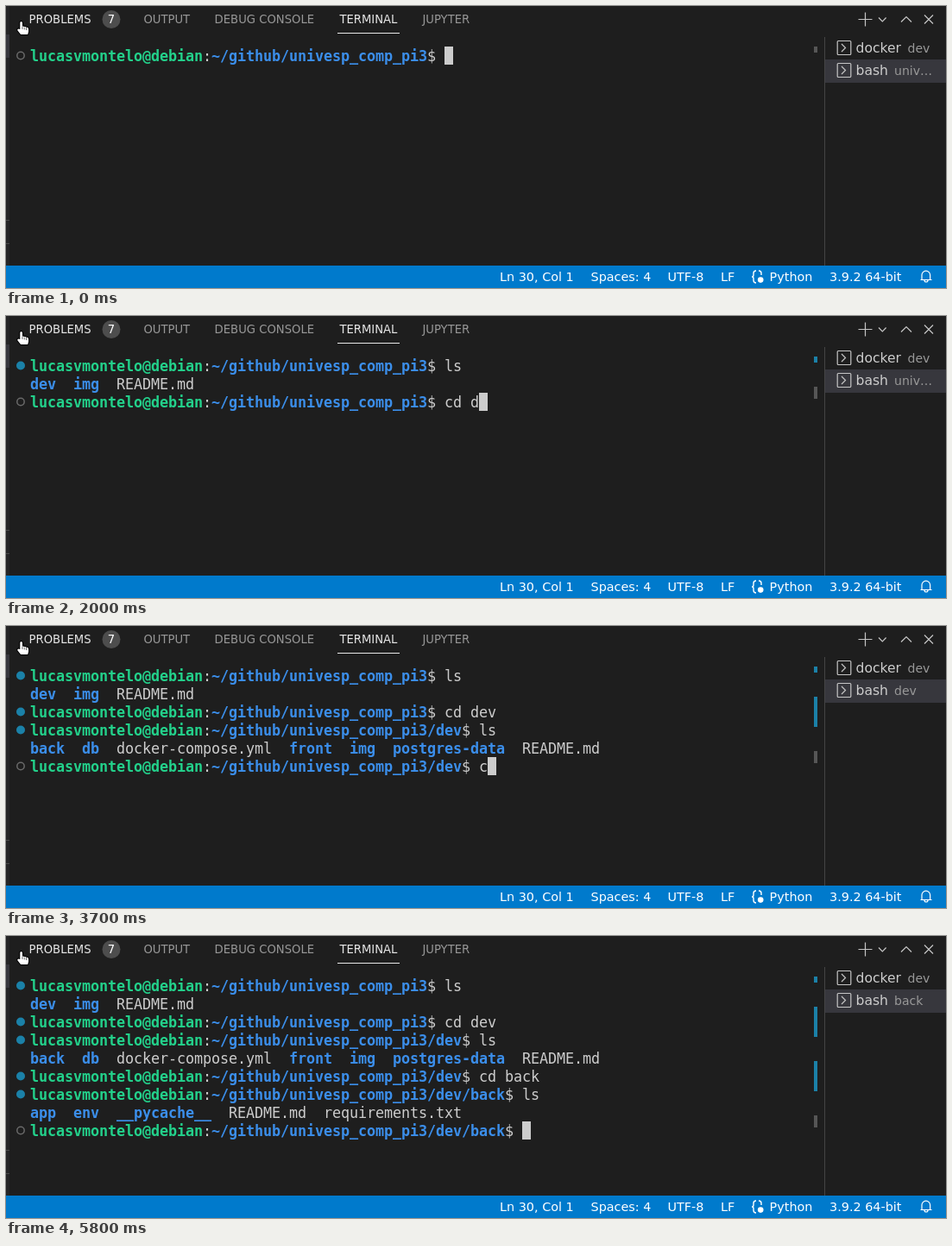
An HTML page with a canvas that plays this animation: 1089 by 327 pixels, repeating every 8000 ms.

```html
<!DOCTYPE html>
<html lang="en">
<head>
<meta charset="utf-8">
<title>Terminal panel</title>
<style>
html, body { margin: 0; width: 100%; height: 100%; overflow: hidden; background: #1e1e1e; }
canvas { display: block; }
</style>
</head>
<body>
<canvas id="stage" width="1089" height="327"></canvas>
<script>
const ctx = document.getElementById('stage').getContext('2d');
const LOOP = 8000, LEFT = 28, TOP = 47, CELL = 10, ROW = 21;
const SANS = '"DejaVu Sans", sans-serif';
const MONO = '16.8px "DejaVu Sans Mono", monospace';
const GREEN = '#23d18b', BLUE = '#3b8eea', FG = '#cccccc', DONE = '#1b81a8', IDLE = '#565656';
const USER = 'lucasvmontelo@debian', HOME = '~/github/univesp_comp_pi3';

// A leading * in the output marks a directory.
const jobs = [
  { path: '', cmd: 'ls', keys: [700, 800], enter: 1000, mark: 1100, out: '*dev  *img  README.md' },
  { path: '', cmd: 'cd dev', keys: [1600, 1700, 1800, 2000, 2200, 2300], enter: 2500 },
  { path: '/dev', cmd: 'ls', keys: [2800, 3000], enter: 3100,
    out: '*back  *db  docker-compose.yml  *front  *img  *postgres-data  README.md' },
  { path: '/dev', cmd: 'cd back', keys: [3700, 3800, 3900, 4200, 4300, 4700, 4900], enter: 5300 },
  { path: '/dev/back', cmd: 'ls', keys: [5500, 5600], enter: 5800,
    out: '*app  *env  *__pycache__  README.md  requirements.txt' },
  { path: '/dev/back', cmd: '', keys: [], enter: Infinity }
];

function rect(x, y, w, h, color) {
  ctx.fillStyle = color;
  ctx.fillRect(x, y, w, h);
}

function label(text, x, y, size, color) {
  ctx.font = size + 'px ' + SANS;
  ctx.fillStyle = color;
  ctx.fillText(text, x, y);
}

function disc(x, y, r, color) {
  ctx.fillStyle = color;
  ctx.beginPath();
  ctx.arc(x, y, r, 0, Math.PI * 2);
  ctx.fill();
}

function stroke(d, color, width = 1.2) {
  ctx.strokeStyle = color;
  ctx.lineWidth = width;
  ctx.stroke(new Path2D(d));
}

function cells(text, col, row, color, bold) {
  ctx.font = (bold ? 'bold ' : '') + MONO;
  ctx.fillStyle = color;
  [...text].forEach((ch, i) => ctx.fillText(ch, LEFT + (col + i) * CELL, TOP + row * ROW + 17));
  return col + text.length;
}

function prompt(path, row) {
  let col = cells(USER, 0, row, GREEN, true);
  col = cells(':', col, row, FG);
  col = cells(HOME + path, col, row, BLUE, true);
  return cells('$ ', col, row, FG);
}

function listing(out, row) {
  let col = 0;
  for (const name of out.split('  ')) {
    const dir = name[0] === '*';
    col = cells(dir ? name.slice(1) : name, col, row, dir ? BLUE : FG, dir) + 2;
  }
}

function marker(row, done, joined) {
  const y = TOP + row * ROW;
  if (done) {
    disc(17, y + 10.5, 5, DONE);
  } else {
    ctx.strokeStyle = '#6a6a6a';
    ctx.lineWidth = 1.5;
    ctx.beginPath();
    ctx.arc(17, y + 10.5, 4.2, 0, Math.PI * 2);
    ctx.stroke();
  }
  const top = Math.max(TOP, y - 7 - (joined ? 7 : 0));
  rect(936, top, 4, y + 7 - top, done ? DONE : IDLE);
}

function terminal(t) {
  let row = 0, lastDone = -2, current;
  for (const job of jobs) {
    current = job;
    const typed = job.keys.filter(k => t >= k).length;
    const col = cells(job.cmd.slice(0, typed), prompt(job.path, row), row, FG);
    const done = t >= (job.mark || job.enter);
    const hidden = row === 2 && t < jobs[0].mark;
    if (!hidden) marker(row, done, done && lastDone === row - 1);
    if (done) lastDone = row;
    if (t < job.enter) {
      rect(LEFT + col * CELL, TOP + row * ROW, CELL, ROW, FG);
      break;
    }
    row++;
    if (job.out) listing(job.out, row++);
  }
  return current.path.split('/').pop() || 'univ…';
}

function header() {
  const on = '#e7e7e7', off = '#979797';
  label('PROBLEMS', 26.6, 20, 13.2, on);
  label('OUTPUT', 159.4, 20, 13.2, off);
  label('DEBUG CONSOLE', 241.6, 20, 13.2, off);
  label('TERMINAL', 386.4, 20, 13.2, on);
  label('JUPYTER', 482.4, 20, 13.2, off);
  rect(384, 31, 72, 1, on);
  disc(122, 15.5, 10.5, '#4d4d4d');
  label('7', 117.8, 20, 13.2, '#ffffff');
  stroke('M987.5 15.5h16M995.5 7.5v16M1011 13.5l4.3 4.3 4.3-4.3', '#c5c5c5');
  stroke('M1037 18.5l6-6 6 6M1064 10.5l10 10M1074 10.5l-10 10', '#c5c5c5');
}

function tab(y, name, x, info) {
  stroke(`M964.2 ${y - 8}h13.6q1 0 1 1v14q0 1-1 1h-13.6q-1 0-1-1v-14q0-1 1-1zM968 ${y - 4.5}l4.5 4.5-4.5 4.5`, '#c5c5c5');
  label(name, 984.5, y + 5.5, 15.6, FG);
  label(info, x, y + 5.5, 14.04, '#999999');
}

function sidebar(info) {
  rect(948, 36, 1, 265, '#444444');
  rect(949, 62, 140, 27, '#37373d');
  tab(48.5, 'docker', 1044.5, 'dev');
  tab(74.5, 'bash', 1029, info);
}

function statusBar() {
  rect(0, 301, 1089, 26, '#007acc');
  const items = [['Ln 30, Col 1', 572], ['Spaces: 4', 677.5], ['UTF-8', 766.5], ['LF', 828],
    ['Python', 884.6], ['3.9.2 64-bit', 954]];
  for (const [text, x] of items) label(text, x, 319, 14.4, '#ffffff');
  stroke('M869 307q-3 0-3 3v2q0 2-2 2 2 0 2 2v2q0 3 3 3M872 307q3 0 3 3v2', '#ffffff', 1.4);
  disc(874.2, 317.6, 3.3, '#ffffff');
  stroke('M1059.5 317.5h13M1061 317.5v-5.5a4.8 4.8 0 0 1 9.6 0v5.5M1064 318a2 2 0 0 0 4 0', '#ffffff');
}

function pointer() {
  const hand = 'M16.3 27V19.5q0-1.6 1.3-1.6t1.4 1.6v4.2q1.3-.8 2.3.4 1.4-.6 2.2.6 2.6-.3 2.6 2v3l-1 3.3h-8l-3.6-4.6q-.7-1.6.6-2z';
  stroke(hand, '#000000', 2);
  ctx.fillStyle = '#ffffff';
  ctx.fill(new Path2D(hand));
  stroke('M19 24v3M21.3 24.5v3M23.5 25v3', '#333333', 0.7);
}

function frame() {
  const t = performance.now() % LOOP;
  rect(0, 0, 1089, 327, '#1e1e1e');
  rect(0, 0, 4, 301, '#252526');
  rect(0, 33, 4, 27, '#37373d');
  rect(0, 248, 4, 1, '#4a4a4a');
  rect(0, 275, 4, 1, '#4a4a4a');
  header();
  sidebar(terminal(t));
  statusBar();
  pointer();
  requestAnimationFrame(frame);
}
frame();
</script>
</body>
</html>
```
